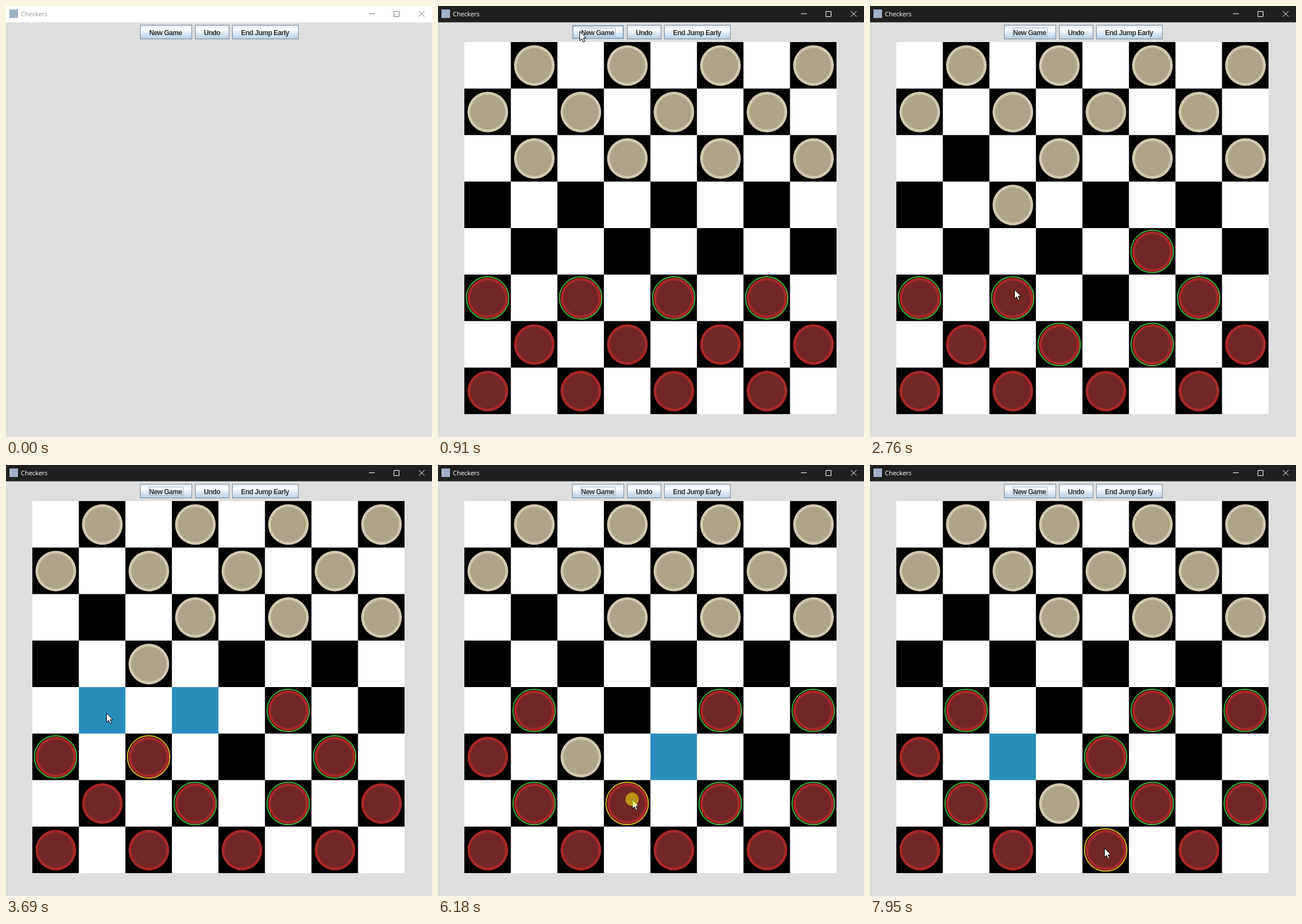
An HTML page for the animation above (8 s loop, 744x753 px).

```html
<!DOCTYPE html>
<html lang="en">
<head>
<meta charset="utf-8">
<title>Checkers</title>
<style>
  html, body { margin: 0; width: 100%; height: 100%; overflow: hidden; background: #dedede; }
  svg { display: block; }
  .title { font: 11px "Open Sans", "Noto Sans", sans-serif; }
  .label { font: bold 12px "Liberation Sans", Arial, sans-serif; letter-spacing: -.5px; fill: #333; }
</style>
</head>
<body>
<svg width="744" height="753" viewBox="0 0 744 753">
  <defs>
    <linearGradient id="metal" x2="0" y2="1">
      <stop offset="0" stop-color="#dde8f3"/>
      <stop offset=".3" stop-color="#fff"/>
      <stop offset=".6" stop-color="#dde8f3"/>
      <stop offset="1" stop-color="#b8cfe5"/>
    </linearGradient>
  </defs>
  <rect width="744" height="753" fill="#dedede"/>
  <g id="bar"></g>
  <g id="buttons"></g>
  <g id="board"></g>
  <g id="pointer">
    <path d="M.5 .5V16.5L4.2 13L6.8 18.9L9.4 17.8L6.9 12H11.6Z" fill="#fff" stroke="#000"/>
    <circle id="press" r="11.7" fill="#ff0" fill-opacity=".5"/>
  </g>
</svg>
<script>
const LOOP = 8000, FRAME = 77, OPEN = 910, THINK = 720, PRESS = 140;
const CELL = 81.25, LEFT = 46, TOP = 63;
const $ = id => document.getElementById(id);

// The pointer glides to each stop, waits a moment and presses there.
const stop = (arrive, glide, x, y, wait = 70) => ({ arrive, glide, x, y, press: arrive + wait });
const start = { x: 684, y: 700 };
const stops = [
  stop(610, 540, 247, 44),
  stop(1540, 540, 408, 500),
  stop(1920, 300, 497, 435),
  stop(2530, 375, 252, 495, 480),
  stop(3690, 520, 175, 433),
  stop(4480, 640, 571, 500),
  stop(4850, 220, 640, 437),
  stop(6020, 920, 339, 584),
  stop(6445, 200, 408, 520),
  stop(7710, 540, 409, 669)
];

// Squares are row * 10 + column. The pale side answers with one man on this route.
const route = [21, 32, 43, 52, 63];

const buttons = [
  { text: "New Game", x: 234, w: 91, tx: 250 },
  { text: "Undo", x: 330, w: 60, tx: 345.5 },
  { text: "End Jump Early", x: 395, w: 116, tx: 410.5 }
];

const box = (x, y, w, h, fill, stroke = "none") =>
  `<rect x="${x}" y="${y}" width="${w}" height="${h}" fill="${fill}" stroke="${stroke}"/>`;
const disc = (x, y, r, fill, stroke = "none") =>
  `<circle cx="${x}" cy="${y}" r="${r}" fill="${fill}" stroke="${stroke}" stroke-width="2"/>`;
const ease = p => p * p * (3 - 2 * p);
const squareAt = (x, y) => Math.floor((y - TOP) / CELL) * 10 + Math.floor((x - LEFT) / CELL);

function pointerAt(t) {
  return stops.reduce((from, s) => {
    const p = ease(Math.min(1, Math.max(0, 1 + (t - s.arrive) / s.glide)));
    return { x: from.x + (s.x - from.x) * p, y: from.y + (s.y - from.y) * p };
  }, start);
}

function newGame() {
  const men = new Map();
  for (let r = 0; r < 8; r++)
    for (let c = 0; c < 8; c++)
      if ((r + c) % 2 && (r < 3 || r > 4)) men.set(r * 10 + c, r < 3 ? "pale" : "red");
  return men;
}

function move(men, from, to) {
  men.set(to, men.get(from));
  men.delete(from);
}

// Forward steps and single jumps for a red man.
function targets(men, from) {
  const inside = s => s >= 0 && s % 10 < 8;
  const found = [];
  for (const d of [-11, -9]) {
    const near = from + d, far = near + d;
    if (!inside(near)) continue;
    if (!men.has(near)) found.push(near);
    else if (men.get(near) === "pale" && inside(far) && !men.has(far)) found.push(far);
  }
  return found;
}

// Replays all presses up to time t.
function gameAt(t) {
  const men = newGame();
  let chosen = null, turn = 0;
  for (const s of stops.filter(s => s.press <= t)) {
    const square = squareAt(s.x, s.y);
    if (men.get(square) === "red") chosen = square;
    else if (chosen !== null && t >= s.press + THINK) {
      move(men, chosen, square);
      move(men, route[turn], route[++turn]);
      chosen = null;
    }
  }
  return { men, chosen };
}

function drawBar(active) {
  const ink = active ? "#fff" : "#999", line = active ? "#fff" : "#777";
  return box(0, 0, 744, 28.5, active ? "#202020" : "#fff") +
    box(6, 6, 15, 15, "#9fb0c8") +
    `<text class="title" x="26" y="18" fill="${ink}">Checkers</text>` +
    `<path d="M634 13.5H644M677.5 9.5H686.5V18.5H677.5ZM721 9L731 18.5M731 9L721 18.5" fill="none" stroke="${line}"/>`;
}

function drawButtons(active, x, y) {
  return buttons.map((b, i) => {
    const over = x >= b.x && x < b.x + b.w && y >= 33 && y < 58;
    let s = box(b.x + .5, 33.5, b.w - 1, 24, "url(#metal)", over ? "#b8cfe5" : "#7a8a99");
    if (over) s += box(b.x + 1.5, 34.5, b.w - 3, 22, "none", "#7a8a99") +
      box(b.x + 2.5, 35.5, b.w - 5, 20, "none", "#b8cfe5");
    if (active && i === 0) s += box(249.5, 38.5, 60, 15, "none", "#a3b8cc");
    return s + `<text class="label" x="${b.tx}" y="50.5">${b.text}</text>`;
  }).join("");
}

function drawBoard({ men, chosen }) {
  const goals = chosen === null ? [] : targets(men, chosen);
  let s = box(LEFT, TOP, 8 * CELL, 8 * CELL, "#fff");
  for (let r = 0; r < 8; r++)
    for (let c = 1 - r % 2; c < 8; c += 2)
      s += box(LEFT + c * CELL, TOP + r * CELL, CELL, CELL,
        goals.includes(r * 10 + c) ? "#278ebc" : "#000");
  for (const [square, side] of men) {
    const x = LEFT + 41 + square % 10 * CELL, y = TOP + 41 + Math.floor(square / 10) * CELL;
    const red = side === "red";
    if (red && targets(men, square).length)
      s += disc(x - .4, y - .2, 37, "none", square === chosen ? "#d8b422" : "#3cb43c");
    s += disc(x, y, 35.5, red ? "#a82828" : "#d2c8b0") +
      disc(x, y, 30.7, red ? "#732626" : "#aca588");
  }
  return s;
}

let shown = -1;
function render(time) {
  const t = Math.floor((time % LOOP + 15) / FRAME) * FRAME;
  if (t === shown) return;
  shown = t;
  const active = t >= OPEN, { x, y } = pointerAt(t);
  const pressed = stops.some(s => t >= s.press && t < s.press + PRESS);
  $("bar").innerHTML = drawBar(active);
  $("buttons").innerHTML = drawButtons(active, x, y);
  $("board").innerHTML = active ? drawBoard(gameAt(t)) : "";
  $("pointer").setAttribute("transform", `translate(${Math.round(x)} ${Math.round(y)})`);
  $("pointer").setAttribute("display", t ? "inline" : "none");
  $("press").setAttribute("display", pressed ? "inline" : "none");
}

const begin = performance.now();
function tick() {
  render(performance.now() - begin);
  requestAnimationFrame(tick);
}
tick();
</script>
</body>
</html>
```
